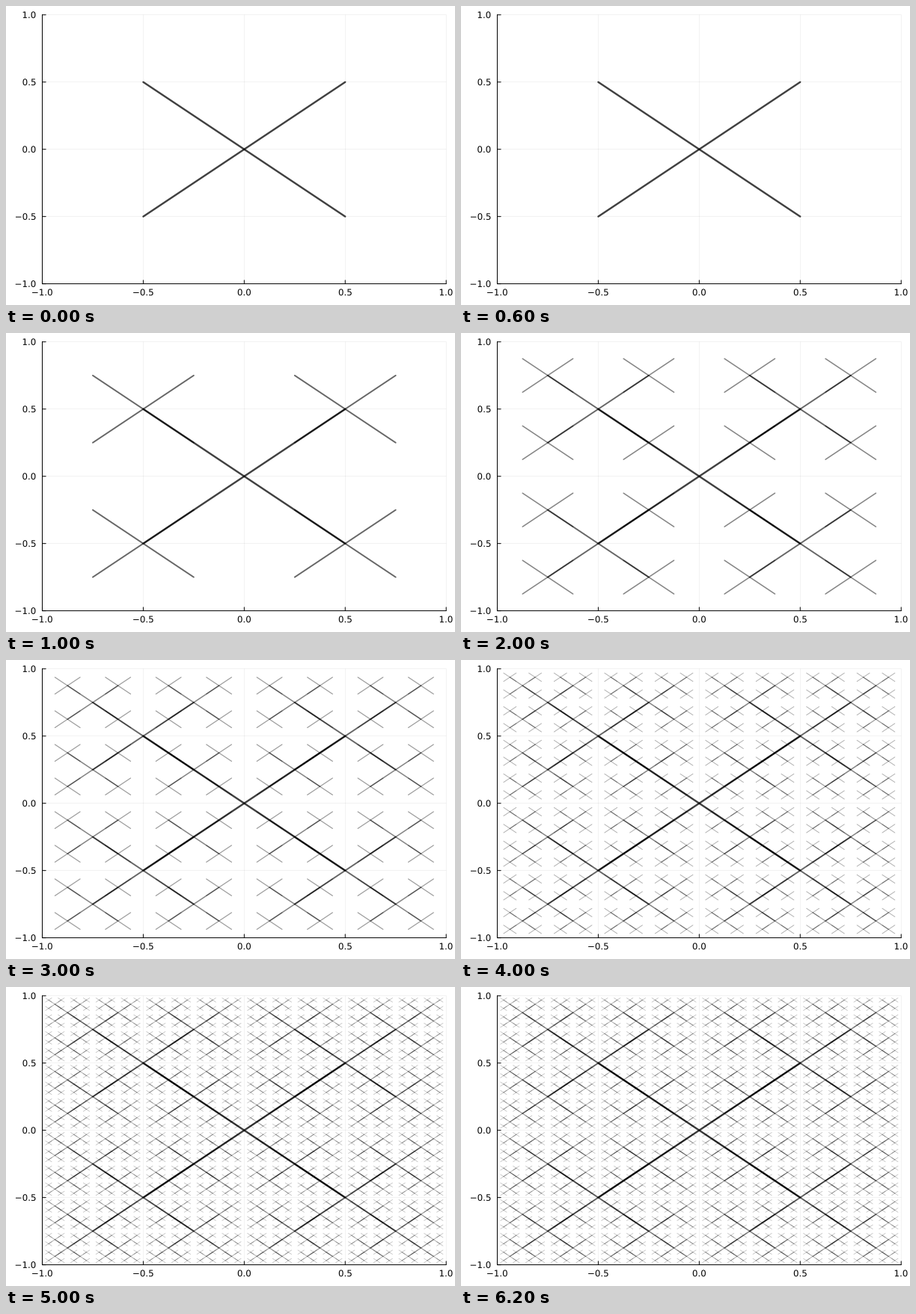
A matplotlib script that plays this animation: 600x400 px, repeating every 7000 ms.

```python
import numpy as np
import matplotlib.pyplot as plt
from matplotlib.animation import FuncAnimation
from matplotlib.collections import LineCollection
from matplotlib.patches import PathPatch
from matplotlib.textpath import TextPath
from matplotlib.transforms import Affine2D

W, H, DPI = 600, 400, 100
PX = 72 / DPI  # points per pixel
LEFT, RIGHT, TOP, BOTTOM = 48.48, 588.19, 11.81, 371.61
TICK = 4.72
FONT = 11.85
DEPTH = 6
FADE = 0.8

plt.rcParams.update({"font.family": "DejaVu Sans", "path.snap": False})


def to_px(x, y):
    return (LEFT + (x + 1) / 2 * (RIGHT - LEFT),
            BOTTOM - (y + 1) / 2 * (BOTTOM - TOP))


def crosses(level):
    """Both diagonals of every cross at one level of the recursion."""
    half = 0.5 ** (level + 1)
    mids = -1 + half * (2 * np.arange(2 ** level) + 1) * 2
    segs = []
    for x in mids:
        for y in mids:
            for s in (1, -1):
                segs.append([to_px(x - half, y - s * half),
                             to_px(x + half, y + s * half)])
    return segs


fig = plt.figure(figsize=(W / DPI, H / DPI), dpi=DPI, facecolor="white")
ax = fig.add_axes([0, 0, 1, 1])
ax.set_xlim(0, W)
ax.set_ylim(H, 0)
ax.axis("off")


def add_lines(segs, width, alpha=1.0, z=2):
    lines = LineCollection(segs, colors="black", linewidths=width * PX,
                           alpha=alpha, zorder=z, capstyle="round")
    ax.add_collection(lines, autolim=False)
    return lines


def add_label(text, x, middle, align):
    """Place text by its ink: align 0.5 centres it on x, 1 ends it there."""
    path = TextPath((0, 0), text, size=FONT)
    box = path.get_extents()
    place = Affine2D().scale(1, -1).translate(
        x - box.x0 - align * box.width, middle + 0.364 * FONT)
    ax.add_patch(PathPatch(place.transform_path(path), fc="black", lw=0))


grid, ticks = [], []
for v in np.linspace(-1, 1, 5):
    x, y = to_px(v, v)
    grid += [[(x, BOTTOM), (x, TOP)], [(LEFT, y), (RIGHT, y)]]
    ticks += [[(x, BOTTOM), (x, BOTTOM - TICK)], [(LEFT, y), (LEFT + TICK, y)]]
    label = f"{v:.1f}".replace("-", "\u2212")
    add_label(label, x, BOTTOM + 11.29, 0.5)
    add_label(label, LEFT - 9, y, 1)

add_lines(grid, 0.5, 0.1, 1)
add_lines(ticks, 1)
add_lines([[(LEFT, BOTTOM), (RIGHT, BOTTOM)], [(LEFT, BOTTOM), (LEFT, TOP)]], 1)

levels = [add_lines(crosses(k), 2.4 * FADE ** k, 0.75 * FADE ** k, 3)
          for k in range(DEPTH)]


def draw(step):
    for k, lines in enumerate(levels):
        lines.set_visible(k <= step)
    return levels


anim = FuncAnimation(fig, draw, frames=DEPTH + 1, interval=1000,
                     init_func=lambda: draw(0), repeat=True, repeat_delay=0)
plt.show()
```
